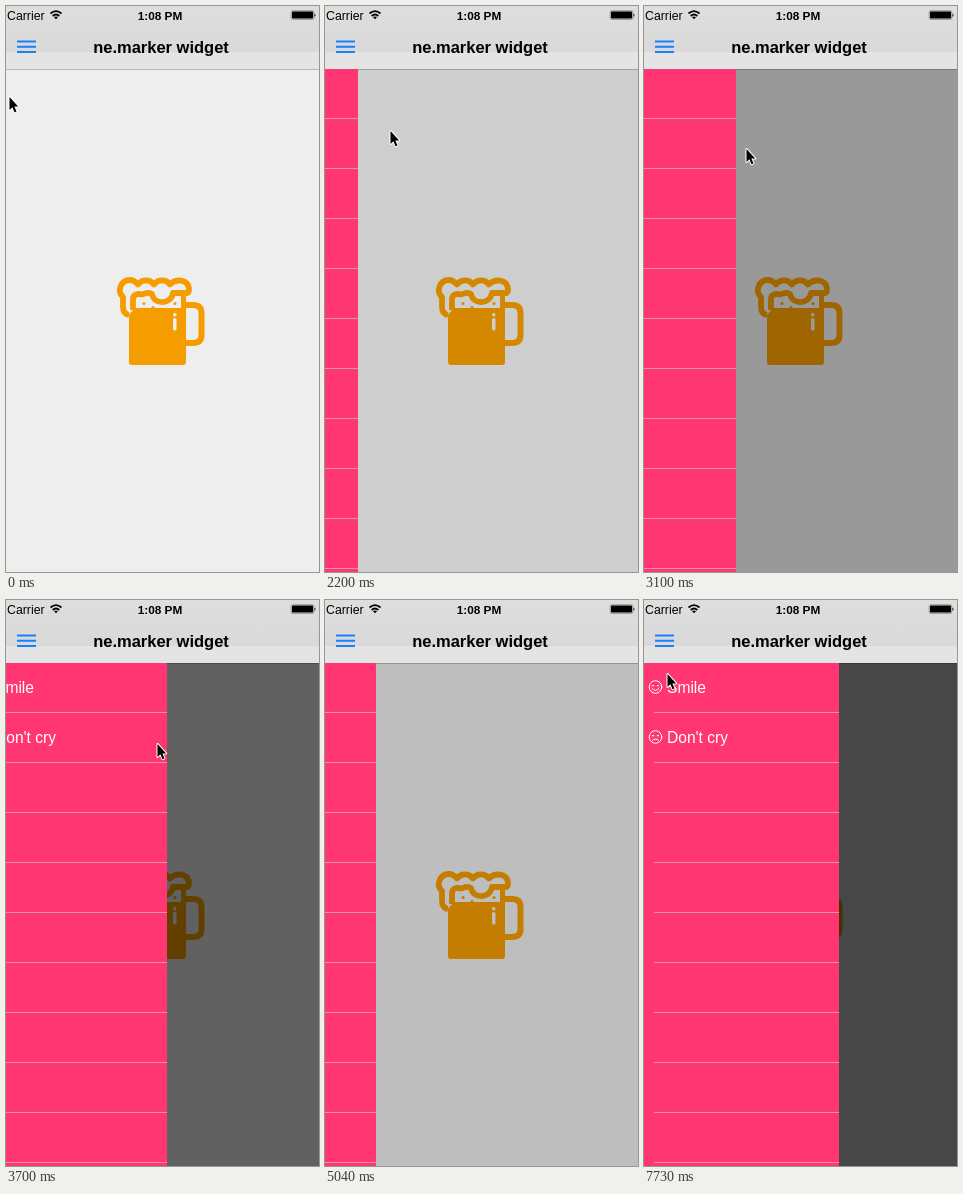
Write an HTML page that moves like this. It is 313 px wide and 566 px high and loops after 8000 ms.

```html
<!DOCTYPE html>
<html lang="en">
<head>
<meta charset="utf-8">
<title>Drawer widget</title>
<style>
  html, body { margin: 0; width: 100%; height: 100%; overflow: hidden; background: #eee; }
  svg { display: block; width: 100vw; height: 100vh; }
  text { font-family: "Liberation Sans", Arial, sans-serif; }
</style>
</head>
<body>
<svg viewBox="0 0 313 566" preserveAspectRatio="none">
  <defs>
    <linearGradient id="bar" x1="0" y1="0" x2="0" y2="1">
      <stop offset="0" stop-color="#dedede"/>
      <stop offset="1" stop-color="#d9d9d9"/>
    </linearGradient>
  </defs>

  <rect width="313" height="566" fill="#eee"/>
  <rect y="63" width="313" height="1" fill="#b8b8b8"/>

  <g id="mug" fill="#f59d00">
    <path d="M123 290H129V302H175V288H180V356Q180 359 177 359H126Q123 359 123 356Z"/>
    <path d="M180 299H187Q195.500 299 195.500 307V329Q195.500 337 187 337H180" fill="none" stroke="#f59d00" stroke-width="6"/>
    <path d="M123 309Q117 308 117 301V291C111 286 114 274 124 274C128 274 130 276 132 278.500C136 273 144 273 148 278.500C152 273 160 273 164 278.500C169 273 183 272 183 284Q183 288 179 287H167C165 299 148 299 146 288C142 285 139 288 136 288.500C131 287 127 289 127 293V304"
      fill="#eee" stroke="#f59d00" stroke-width="5.800" stroke-linejoin="round"/>
    <circle cx="138" cy="297.500" r="1.500"/>
    <circle cx="147" cy="301.500" r="1.500"/>
    <circle cx="169" cy="297.500" r="1.500"/>
    <g fill="#eee">
      <rect x="167" y="307" width="3.500" height="3.500" rx="1.500"/>
      <rect x="167" y="312" width="3.500" height="12.500" rx="1.500"/>
    </g>
  </g>

  <rect id="shade" y="63" width="313" height="503"/>

  <g>
    <rect width="313" height="46" fill="url(#bar)"/>
    <rect y="46" width="313" height="17" fill="#e4e4e4"/>
    <text x="1" y="13.700" font-size="12.300">Carrier</text>
    <g fill="none" stroke="#000" stroke-width="1.800">
      <path d="M44.500 7.500Q50 2.800 55.500 7.500M46.700 10Q50 7 53.300 10"/>
      <path d="M48 11.300Q50 9.800 52 11.300L50 13.300Z" fill="#000" stroke="none"/>
    </g>
    <text x="154" y="13.600" font-size="11.800" font-weight="700" text-anchor="middle">1:08 PM</text>
    <rect x="285.200" y="4.800" width="22.600" height="8.600" rx="1.500" fill="none" stroke="#666" stroke-width="0.600"/>
    <rect x="286" y="5.600" width="21" height="7" rx="0.800"/>
    <path d="M308.500 7.500Q310.500 9.200 308.500 11Z"/>
    <path d="M11 35.500H30M11 40.700H30M11 46H30" stroke="#1a80fa" stroke-width="2"/>
    <text x="155" y="47" font-size="16.500" font-weight="700" text-anchor="middle">ne.marker widget</text>
  </g>

  <g id="drawer">
    <rect x="-200" y="63" width="200" height="503" fill="#ff3672"/>
    <path id="rules" stroke="#e891a8" stroke-width="1"/>
    <g fill="none" stroke="#fff" stroke-linecap="round">
      <g transform="translate(-183.500 87)">
        <circle r="6.300"/>
        <path d="M-3.300 -1.300H-1.700M1.700 -1.300H3.300M-3.500 1.300Q0 5.800 3.500 1.300"/>
      </g>
      <g transform="translate(-183.500 137)">
        <circle r="6.300"/>
        <path d="M-3.300 -1.300H-1.700M1.700 -1.300H3.300M-3 3.300Q0 0.500 3 3.300"/>
      </g>
    </g>
    <g fill="#fff" font-size="15.600">
      <text x="-172" y="93">Smile</text>
      <text x="-172" y="143">Don't cry</text>
    </g>
  </g>

  <path id="cursor" d="M0.500 1V14L3.400 11.300L5.500 16.200L7.500 15.400L5.400 10.500H9.200Z"
    stroke="#fff" stroke-width="2" stroke-linejoin="round" paint-order="stroke"/>
</svg>
<script>
  // The picture advances in held steps; all timings below are in steps.
  const LOOP = 8000, STEP = 148.5, LEAD = 28;
  const FULL = 195, HALF = 87.5;
  const el = id => document.getElementById(id);
  const drawer = el("drawer"), shade = el("shade"), cursor = el("cursor");

  const ramp = (s, from, to) => Math.min(1, Math.max(0, (s - from) / (to - from)));
  const smooth = p => p * p * (3 - 2 * p);
  const easeOut = (p, power) => 1 - (1 - p) ** power;

  const firstPull = s => ramp(s, 13, 17.8);
  const secondPull = s => smooth(ramp(s, 20, 28));

  function drawerWidth(s) {
    if (s >= 48) return FULL * easeOut(ramp(s, 48, 52), 3);
    const pulled = HALF * smooth(firstPull(s)) + (FULL - HALF) * secondPull(s);
    return Math.round(pulled * (1 - ramp(s, 29, 35) ** 1.67));
  }

  function cursorAt(s) {
    if (s < 8) return [3 + 100 * Math.sin(Math.PI * s / 8), 90 + 23 * smooth(s / 8)];
    if (s < 30) {
      const p = firstPull(s), q = secondPull(s);
      return [98.7 * easeOut(p, 2) + 76.6 * q, 113 + 28.5 * smooth(p) + 2.5 * q];
    }
    if (s < 37) return null; // out of sight while the drawer closes
    const approach = ramp(s, 37, 44), toButton = ramp(s, 44, 47), toList = ramp(s, 49, 52);
    return [140 - 86 * approach - 34 * toButton + 3 * toList,
            285 - 168 * approach - 81 * toButton + 37 * toList];
  }

  function draw(t) {
    const s = Math.floor((t + LEAD) / STEP);
    const w = drawerWidth(s), tip = cursorAt(s);
    drawer.setAttribute("transform", `translate(${w} 0)`);
    drawer.setAttribute("visibility", w > 0 ? "visible" : "hidden");
    shade.setAttribute("opacity", w * (0.0041 - 0.0000026 * w));
    cursor.setAttribute("visibility", tip ? "visible" : "hidden");
    if (tip) cursor.setAttribute("transform", `translate(${tip.map(Math.round).join(" ")})`);
  }

  el("rules").setAttribute("d",
    Array.from({ length: 10 }, (_, i) => `M-185 ${112.5 + 50 * i}H0`).join(""));

  const start = performance.now();
  function tick() {
    draw((performance.now() - start) % LOOP);
    requestAnimationFrame(tick);
  }
  draw(0);
  requestAnimationFrame(tick);
</script>
</body>
</html>
```
